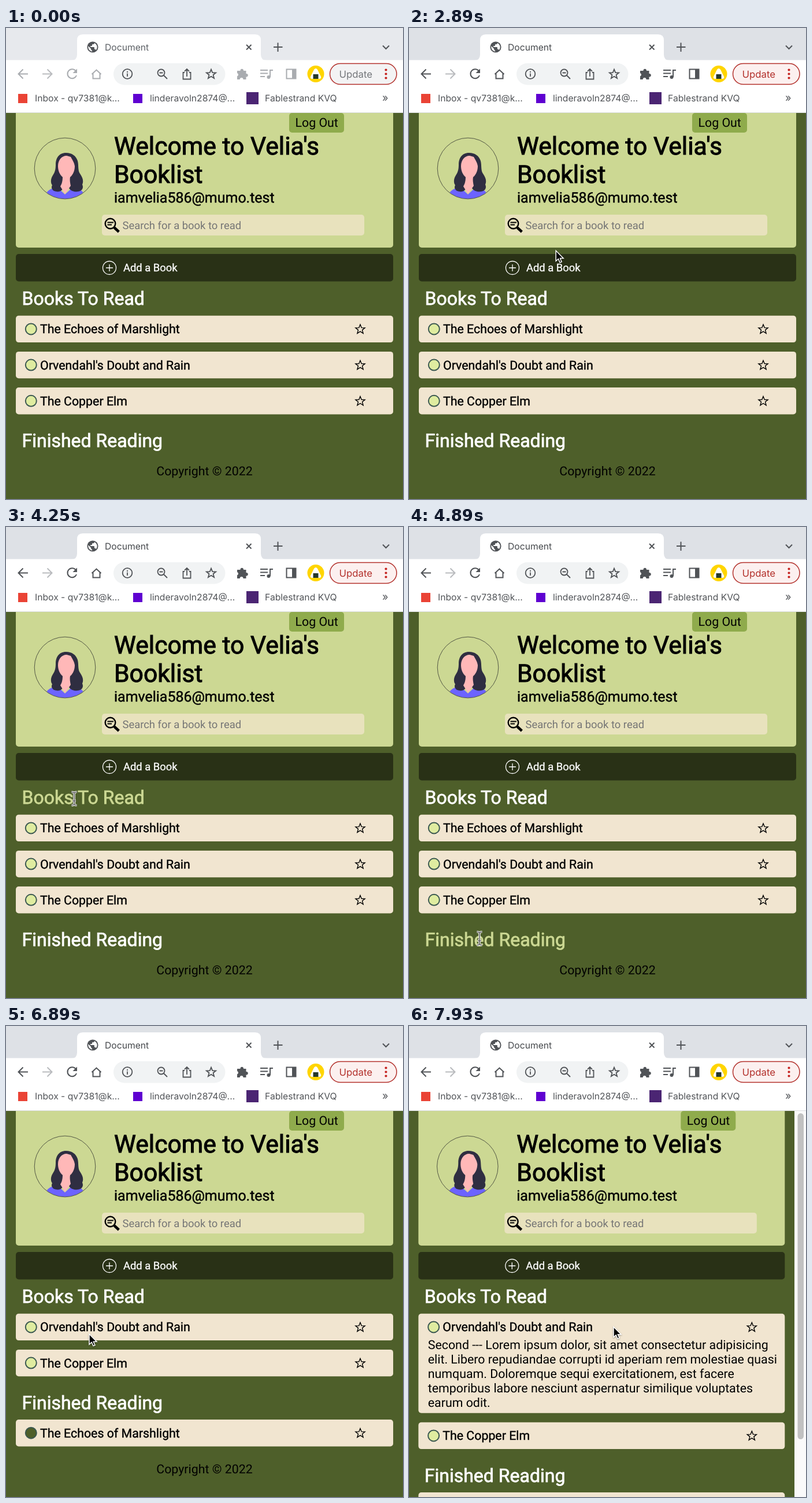
Write an HTML page that moves like this. It is 687 by 815 pixels and loops after 8 s.

```html
<!DOCTYPE html>
<html lang="en">
<head>
<meta charset="utf-8">
<title>Document</title>
<style>
  html, body { margin: 0; width: 687px; height: 815px; overflow: hidden; background: #4e5f2a; }
  svg { display: block; --ico: #505357; --strip: #dee1e6; --pill: #fcf0ef; --upd: #b3312c; --tab: #45484c; }
  svg.idle { --ico: #a9acb0; --strip: #e7e9ed; --pill: #f3f3f4; --upd: #74777b; --tab: #5c6065; }
  text { font-family: Roboto, sans-serif; white-space: pre; text-rendering: geometricPrecision; }
  .ui text { font-family: Inter, sans-serif; }
  .bold { stroke: currentColor; }
  .line { fill: none; stroke: var(--ico); stroke-width: 2; }
  .solid { fill: var(--ico); }
  .fixed { --ico: #505357; }
  .heading { fill: #fff; color: #fff; }
  .heading.hover { fill: #ccd893; color: #ccd893; }
</style>
</head>
<body>
<svg id="stage" width="687" height="815" viewBox="0 0 687 815">
  <defs>
    <clipPath id="view"><rect y="147" width="687" height="668"/></clipPath>
    <clipPath id="disc"><circle cx="102" cy="243" r="52.5"/></clipPath>
    <path id="star" d="M0-8.300 2.200-2.800 8.100-2.500 3.500 1.200 5.100 7 0 3.700-5.100 7-3.500 1.200-8.100-2.500-2.200-2.800Z"/>
    <g id="portrait">
      <g clip-path="url(#disc)">
        <path fill="#6c63ff" d="M66 298C67 284 75 278 88 275L102 288 116 275C129 278 137 284 138 298Z"/>
        <path fill="#2f2e41" d="M104 216C91 216 86 226 86 236C86 244 85 249 81 255C77 261 77 268 80 272C77 277 81 283 88 283C93 284 97 281 99 277H109C112 282 118 284 124 283C131 283 135 277 132 271C135 264 132 258 128 252C124 246 126 238 124 230C121 221 114 216 104 216Z"/>
        <path fill="#ffb8b8" d="M105 221C96 221 90 229 90 239C90 248 94 255 98 258C98 266 96 271 94 274L102 287 112 273C111 268 110 263 111 258C116 254 119 247 119 239C118 232 114 227 112 223Z"/>
      </g>
      <circle cx="102" cy="243" r="52.8" fill="none" stroke="#45483a" stroke-width=".9"/>
    </g>
    <g id="lens" fill="none" stroke="#000">
      <circle cx="180.5" cy="338.5" r="8.800" stroke-width="2.4"/>
      <path stroke-width="4.600" d="M187 345 195.300 352.800"/>
      <path stroke-width="1.9" d="M175.5 336.5H186M175.5 340.5H183"/>
    </g>
  </defs>

  <g id="pages" clip-path="url(#view)"></g>

  <g class="ui">
    <rect width="687" height="147" fill="#fff"/>
    <rect width="687" height="55.5" fill="var(--strip)"/>
    <path fill="#fff" d="M113 56Q123 56 123 46V21Q123 11 133 11H431Q441 11 441 21V46Q441 56 451 56Z"/>
    <path d="M0 146.5H687" stroke="#d9dcdf"/>
    <g class="fixed">
      <circle class="solid" cx="150" cy="33" r="9.6"/>
      <path fill="#fff" transform="translate(138.500 21.500) scale(.96)" d="M11 20C7 19.500 4 16 4 12L4.200 10.200 9 15V16Q9 18 11 18ZM17.900 17.400Q17.400 16 16 16H15V13Q15 12 14 12H8V10H10Q11 10 11 9V7H13Q15 7 15 5V4.600C18 6 20 9 20 12Q20 15 17.900 17.400Z"/>
      <path class="line" d="M416 29 424.500 37.500M424.500 29 416 37.500M470.500 25.500V41M463 33H478.500M652 30.500 657.500 36 663 30.500"/>
    </g>
    <text x="171" y="38.500" font-size="15.7" fill="var(--tab)">Document</text>

    <rect x="186" y="61" width="193.500" height="37.500" rx="18.700" fill="#f1f3f4"/>
    <path class="line" d="M38 79.500H22M29.500 71.500 21.500 79.500 29.500 87.500M120.500 74A8 8 0 1 0 122 82M148.500 80 156.500 72.500 164.500 80M150.500 78.500V87.500H162.500V78.500"/>
    <path fill="none" stroke="#b9bbbe" stroke-width="2" d="M63 79.500H79M71.500 71.500 79.500 79.500 71.500 87.500"/>
    <path class="solid" d="M123 70.500V78H115.500Z"/>
    <g class="fixed line" style="stroke-width:1.8">
      <circle cx="210" cy="79.500" r="8.300"/>
      <path d="M210 78.500V84M210 75V77"/>
      <circle cx="268.500" cy="77.500" r="6"/>
      <path d="M273 82 279 88M265.500 77.500H271.500M309 77H306.500V88.500H319.500V77H317M313 84V71.500M309 75 313 71 317 75"/>
      <use href="#star" x="355" y="80"/>
    </g>
    <path class="solid" d="M400 74H405.500A2.800 2.800 0 1 1 411 74H415.500V79A2.800 2.800 0 1 1 415.500 84.500V89H410.500A2.900 2.900 0 0 0 404.700 89H400V83.500A2.900 2.900 0 0 0 400 78Z"/>
    <path class="line" d="M440 73H453M440 78.500H453M440 84H448M457 85V73H462"/>
    <circle class="solid" cx="454.500" cy="85" r="3"/>
    <rect class="line" x="485.500" y="71.500" width="16" height="16"/>
    <rect class="solid" x="495" y="71" width="7" height="17"/>
    <circle cx="536" cy="79.500" r="14.500" fill="#ffd500"/>
    <path fill="#fff" d="M533 72Q536 68 539 72L545 84Q546 88 542 88H530Q526 88 527 84Z"/>
    <path fill="#26382b" d="M531.500 80H540.500V88H531.500Z"/>
    <rect x="560.500" y="61.500" width="115.500" height="36" rx="18" fill="var(--pill)" stroke="#b3312c" stroke-width="1.500"/>
    <text x="576.500" y="86" font-size="16.800" fill="var(--upd)">Update</text>
    <path d="M657.500 72.500V87" fill="none" stroke="#c5221f" stroke-width="4.200" stroke-linecap="round" stroke-dasharray="0 7"/>

    <rect x="21" y="114" width="16" height="16" fill="#ea4335"/>
    <rect x="220" y="114" width="16" height="16" fill="#5f01d1"/>
    <rect x="416" y="111" width="21" height="21" fill="#4b2573"/>
    <g font-size="15.7" fill="#505357">
      <text x="50" y="127">Inbox - qv7381@k...</text>
      <text x="249" y="127">linderavoln2874@...</text>
      <text x="448" y="127">Fablestrand KVQ</text>
      <text x="651" y="127" font-size="18">»</text>
    </g>
  </g>

  <g id="cursor">
    <path id="arrow" fill="#000" stroke="#fff" stroke-width="1.500" style="filter:drop-shadow(0 1px 1px #0006)" d="M0 0V18L4.200 14.200 7 20.600 10 19.300 7.300 13.200H13Z"/>
    <g id="beam" fill="none">
      <path id="bar" stroke="#fff" stroke-width="3.600" d="M-4.500-11.500Q0-11.500 0-9Q0-11.500 4.500-11.500M0-9V9M-4.500 11.500Q0 11.500 0 9Q0 11.500 4.500 11.500M-3 4H3"/>
      <use href="#bar" style="display:none"/>
      <path stroke="#606060" stroke-width="1.600" d="M-4.500-11.500Q0-11.500 0-9Q0-11.500 4.500-11.500M0-9V9M-4.500 11.500Q0 11.500 0 9Q0 11.500 4.500 11.500M-3 4H3"/>
    </g>
  </g>
</svg>

<script>
const $ = id => document.getElementById(id);
const LOOP = 8000, FINISH = 6090, EXPAND = 7770;
const ECHOES = 'The Echoes of Marshlight';
const DOUBT = "Orvendahl's Doubt and Rain";
const ELM = 'The Copper Elm';
const LOREM = [
  'Second --- Lorem ipsum dolor, sit amet consectetur adipisicing',
  'elit. Libero repudiandae corrupti id aperiam rem molestiae quasi',
  'numquam. Doloremque sequi exercitationem, est facere',
  'temporibus labore nesciunt aspernatur similique voluptates',
  'earum odit.'
];

const text = (x, y, size, str, attrs = '') =>
  `<text x="${x}" y="${y}" font-size="${size}" ${attrs}>${str}</text>`;
const bold = (x, y, size, str, weight = 0.024, cls = '') =>
  text(x, y, size, str, `class="bold ${cls}" stroke-width="${size * weight}"`);
const box = (x, y, w, h, fill) =>
  `<rect x="${x}" y="${y}" width="${w}" height="${h}" rx="5" fill="${fill}"/>`;

function row(y, title, cut, done, notes = []) {
  return box(17, y, 653 - cut, notes.length ? 172 : 46.4, '#f1e5d0') +
    `<circle cx="43.3" cy="${y + 23.2}" r="9.5" fill="${done ? '#4e5f2a' : '#dfeca0'}" stroke="#3b5850" stroke-width="2"/>` +
    bold(59, y + 30.6, 21.33, title, 0.018) +
    `<use href="#star" x="${613 - cut}" y="${y + 23.7}" fill="none" stroke="#000" stroke-width="1.4"/>` +
    notes.map((line, i) => text(33.500, y + 60.800 + i * 25.1, 21.33, line)).join('');
}

function page(cut, finishedY, rows) {
  return `<g transform="translate(${cut ? -0.7 : 0})">` +
    '<rect x="-2" y="147" width="692" height="668" fill="#4e5f2a"/>' +
    box(17, 140, 653 - cut, 240, '#ccd893') +
    box(490 - cut, 147, 95, 34, '#8fab4c') + text(500.500 - cut, 171, 21.33, 'Log Out') +
    '<use href="#portrait"/>' +
    bold(187, 218.600, 42.67, "Welcome to Velia's") + bold(187, 268.2, 42.67, 'Booklist') +
    bold(187, 301.5, 24.96, 'iamvelia586@mumo.test', 0.018) +
    box(166, 323, 454 - cut * 0.92, 36, '#e8e2bd') + '<use href="#lens"/>' +
    text(201.500, 348, 18.4, 'Search for a book to read', 'fill="#757575"') +
    box(17, 391, 653 - cut, 47.5, '#293116') +
    '<path d="M173 415H185M179 409V421M190.500 415A11.500 11.500 0 1 1 167.500 415A11.500 11.500 0 1 1 190.500 415" fill="none" stroke="#fff" stroke-width="1.300"/>' +
    `<g fill="#fff" color="#fff">${bold(203, 421.3, 18.4, 'Add a Book', 0.018)}</g>` +
    bold(27.5, 479, 32, 'Books To Read', 0.024, 'heading') +
    bold(27.5, finishedY, 32, 'Finished Reading', 0.024, 'heading') +
    rows +
    (cut ? '' : text(343.5, 774, 21.33, 'Copyright © 2022', 'text-anchor="middle"')) +
    '</g>';
}

const scrollbar = '<rect x="667" y="147" width="20" height="668" fill="#fafafa"/>' +
  '<rect x="672.500" y="151" width="10.500" height="564" rx="5.200" fill="#c1c1c1"/>';

const layouts = [
  page(0, 725, row(497.7, ECHOES, 0) + row(559.9, DOUBT, 0) + row(622.1, ELM, 0)),
  page(0, 662.8, row(497.7, DOUBT, 0) + row(559.9, ELM, 0) + row(681, ECHOES, 0, true)),
  page(19, 788.5, row(497.7, DOUBT, 19, false, LOREM) + row(685.7, ELM, 19) + row(807, ECHOES, 19, true)) + scrollbar
];
$('pages').innerHTML = layouts.map(s => `<g>${s}</g>`).join('');
const pages = [...$('pages').children];
const headings = [...pages[0].querySelectorAll('.heading')];

// Pointer moves: start, end, steps, ease-out power, cubic control points
const moves = [
  [2080, 2560, 7, 1, 216, 194, 232, 240, 228, 300, 197, 344],
  [2810, 3610, 11, 1.6, 202, 350, 370, 420, 153, 537, 46, 519],
  [3690, 3770, 2, 1, 44, 518, 44, 518, 43, 517, 43, 517],
  [4010, 4250, 4, 1.3, 52, 508, 75, 490, 100, 475, 118, 470],
  [4490, 4890, 6, 1.3, 122, 492, 160, 560, 150, 660, 122, 712],
  [5050, 5600, 8, 1.3, 122, 700, 120, 640, 85, 540, 54, 511],
  [5770, 5850, 2, 1, 51, 512, 50, 513, 49, 514, 48, 514],
  [6580, 6890, 5, 1.3, 54, 522, 65, 536, 110, 534, 144, 533],
  [7210, 7610, 6, 1, 200, 500, 420, 380, 560, 500, 354, 520.5]
];

function pointerAt(t) {
  const m = moves.filter(m => t >= m[0]).pop();
  if (!m) return null;
  const [start, end, steps, power, ...p] = m;
  const n = steps - 1;
  const k = Math.min(n, Math.floor((t - start) / (end - start) * n + 1e-6));
  const u = 1 - (1 - k / n) ** power, v = 1 - u;
  const at = i => v ** 3 * p[i] + 3 * v * v * u * p[i + 2] + 3 * v * u * u * p[i + 4] + u ** 3 * p[i + 6];
  return [at(0), at(1)];
}

const areas = {
  header: [187, 541, 180, 360],
  toRead: [28, 238, 452, 484],
  finished: [28, 269, 698, 730],
  titles: [[59, 296, 508, 531], [59, 321, 570, 593], [59, 210, 632, 655]]
};

function render(t) {
  const step = t < FINISH ? 0 : t < EXPAND ? 1 : 2;
  pages.forEach((g, i) => g.style.display = i === step ? '' : 'none');
  $('stage').classList.toggle('idle', t < 90);

  const pos = pointerAt(t);
  $('cursor').style.display = pos ? '' : 'none';
  const over = ([x0, x1, y0, y1]) =>
    !!pos && step === 0 && pos[0] >= x0 && pos[0] <= x1 && pos[1] >= y0 && pos[1] <= y1;
  const hovers = [over(areas.toRead), over(areas.finished)];
  headings.forEach((h, i) => h.classList.toggle('hover', hovers[i]));
  if (!pos) return;

  const beam = over(areas.header) || hovers.includes(true) || areas.titles.some(over);
  $('beam').style.display = beam ? '' : 'none';
  $('arrow').style.display = beam ? 'none' : '';
  $('cursor').setAttribute('transform', `translate(${pos[0].toFixed(1)} ${pos[1].toFixed(1)})`);
}

function tick() {
  render(performance.now() % LOOP);
  requestAnimationFrame(tick);
}
tick();
</script>
</body>
</html>
```
